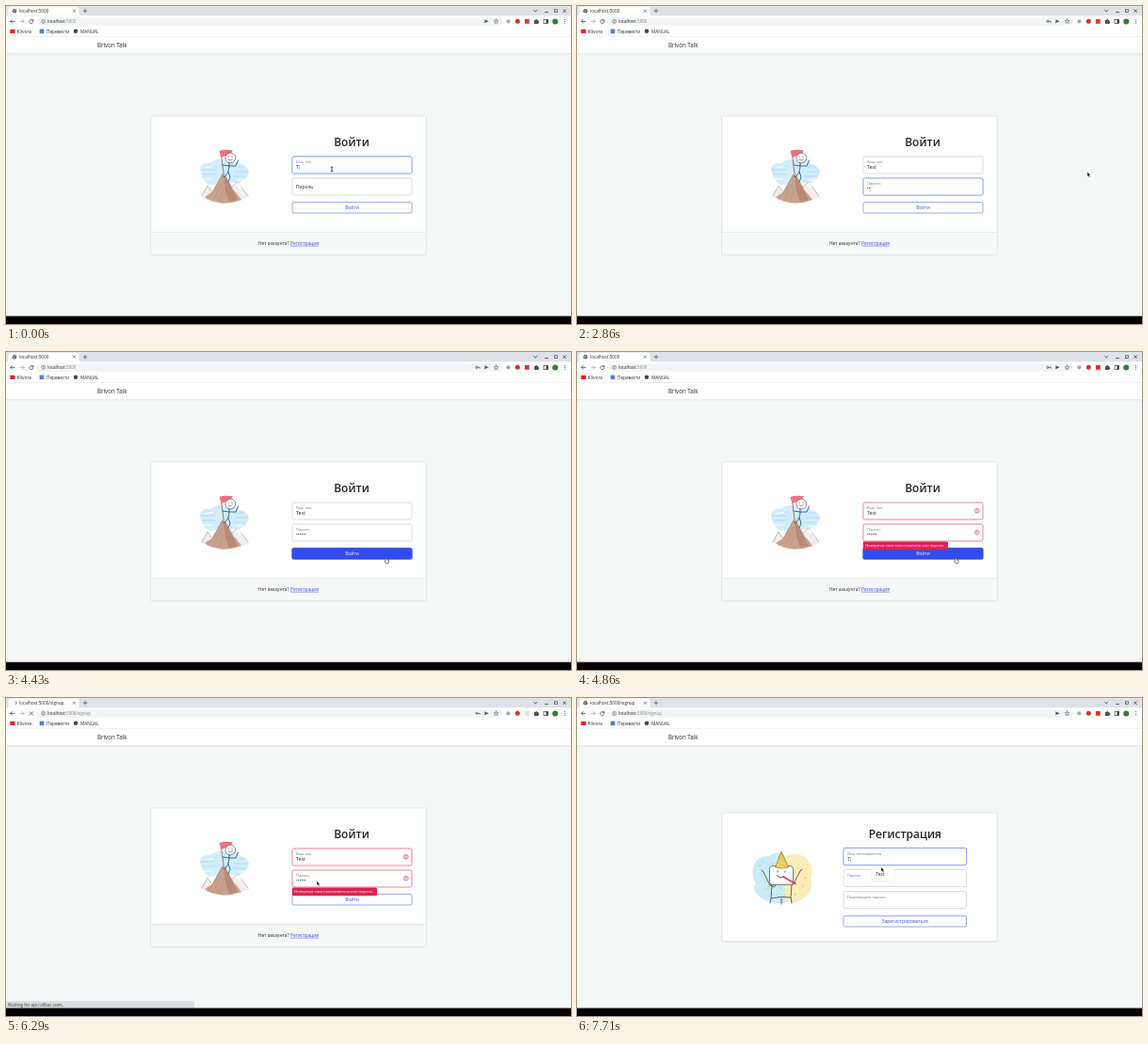
Recreate the animation shown at these times as an HTML page. Size 600x338 px, loop 8 s.

```html
<!DOCTYPE html>
<html lang="ru">
<head>
<meta charset="utf-8">
<style>
  html, body { margin: 0; width: 100%; height: 100%; overflow: hidden; background: #f5f7f7; }
  svg { display: block; font-family: "Open Sans", "Noto Sans", sans-serif; }
</style>
</head>
<body>
<svg id="stage" width="600" height="338" viewBox="0 0 600 338"></svg>
<script>
const LOOP = 8000, TICK = 1000 / 7;
const NICK = 'Test', BLUE = '#304cf0', RED = '#dc3256', INK = '#24272b';

const text = (x, y, size, str, fill = INK, more = '') =>
  `<text x="${x}" y="${y}" font-size="${size}" fill="${fill}" ${more}>${str}</text>`;
const rect = (x, y, w, h, fill, more = '') =>
  `<rect x="${x}" y="${y}" width="${w}" height="${h}" fill="${fill}" ${more}/>`;
const disc = (x, y, r, fill, more = '') =>
  `<circle cx="${x}" cy="${y}" r="${r}" fill="${fill}" ${more}/>`;
const fill = (d, color, more = '') => `<path d="${d}" fill="${color}" ${more}/>`;
const line = (d, color = '#555', w = 0.8) =>
  `<path d="${d}" fill="none" stroke="${color}" stroke-width="${w}" stroke-linecap="round" stroke-linejoin="round"/>`;
const middle = 'text-anchor="middle"';

function globe(x, y) {
  return disc(x, y, 2.3, '#4d5156') +
    line(`M${x - 1.4} ${y - .7}l1.3 .5l-.3 1.4M${x + .6} ${y - 1.5}l.9 1.2`, '#fff', .6);
}

function browser(k) {
  const signup = k >= 38, loading = k >= 38 && k < 48;
  const spin = k * 50 % 360;
  let s = rect(0, 0, 600, 10.5, '#dee1e6') + rect(0, 10.5, 600, 22, '#fff') +
    fill('M0 10.5Q2.5 10.5 2.5 8V3Q2.5 .8 5 .8H75Q77.5 .8 77.5 3V8Q77.5 10.5 80 10.5Z', '#fff');
  s += loading
    ? `<g transform="rotate(${spin} 9 5.3)">${line('M9 3.1A2.2 2.2 0 0 1 11.2 5.3', '#68707a')}</g>`
    : globe(9, 5.3);
  s += text(14, 7.1, 4.65, 'localhost:5000' + (signup ? '/signup' : ''));
  s += line('M71.2 4l2.4 2.4m0 -2.4l-2.4 2.4M82 5.2h4m-2 -2v4', '#50555a', .7);
  s += line('M560.6 4.5l1.6 1.5l1.6 -1.5M572.5 6.6h3M591.7 3.8l2.8 2.8m0 -2.8l-2.8 2.8', '#3c4043', .8) +
    rect(582.6, 3.8, 2.8, 2.8, 'none', 'stroke="#3c4043" stroke-width=".7"');

  s += rect(33, 12.2, 494, 8.6, '#f2f4f5', 'rx="4.3"');
  s += line('M9 16.4H4.8m1.9 -1.9l-1.9 1.9l1.9 1.9', '#484c50') +
    line('M15 16.4h4.2m-1.9 -1.9l1.9 1.9l-1.9 1.9', '#a9adb1');
  s += loading ? line('M25.2 14.6l3.6 3.6m0 -3.6l-3.6 3.6', '#484c50')
    : line('M28.5 15.2A2.1 2.1 0 1 0 29 17M29 14.2v1.7h-1.7', '#484c50', .75);
  s += disc(39.7, 16.4, 2, 'none', 'stroke="#5f6368" stroke-width=".6"') +
    line('M39.7 16.2v1.2M39.7 15.3v.01', '#5f6368', .6);
  s += text(44, 18, 4.5, 'localhost<tspan fill="#85898d">:5000' + (signup ? '/signup' : '') + '</tspan>');
  if (k >= 17 && k < 52) s += disc(499.8, 16.3, 1.1, 'none', 'stroke="#50555a" stroke-width=".8"') + line('M501 16.3h2.2v1', '#50555a');
  s += fill('M508 14.3l4.6 2l-4.6 2l.6 -2Z', '#50555a') +
    line('M520.5 14l.7 1.6l1.7 .1l-1.3 1.1l.4 1.7l-1.5 -.9l-1.5 .9l.4 -1.7l-1.3 -1.1l1.7 -.1Z', '#50555a', .55);
  s += disc(533.4, 16.3, 2.1, '#a5a8ab') + disc(543.3, 16.3, 2.5, '#dc3030') +
    rect(550.9, 14, 4.8, 4.8, loading ? '#f4d3d3' : '#df3434');
  s += fill('M561 15h1.3a.9 .9 0 0 1 1.8 0h1.2v1.3a.9 .9 0 0 1 0 1.8v.8h-4.3Z', '#4b4f53') +
    rect(571, 14.3, 4.5, 4.2, 'none', 'stroke="#3c4043" stroke-width=".7"') + rect(573.5, 14.3, 2, 4.2, '#3c4043') +
    disc(583.2, 16.4, 3, '#347e33') + [14.5, 16.4, 18.3].map(y => disc(593.5, y, .5, '#444')).join('');

  s += rect(4.3, 24.8, 5.2, 4.2, '#ee1c24') + text(11.5, 28.7, 4.9, 'Klivora') +
    rect(35.7, 24.6, 4.6, 4.6, '#4c7fe0') + text(43, 28.7, 4.7, 'Перевести') +
    disc(74, 26.8, 2.3, '#40464c') + text(79, 28.7, 4.7, 'MANUAL');
  s += rect(0, 32.3, 600, .5, '#dcdfe2') + rect(0, 32.8, 600, 17.7, '#fff') +
    rect(0, 50.3, 600, .7, '#e2e5e6') + rect(0, 51, 600, 1.2, '#eff1f1');
  s += text(97, 43.8, 6.2, 'Brivon Talk');
  return s;
}

function card(y, h) {
  return rect(153, y + .5, 294, h + 1, '#e9ebec', 'rx="2"') +
    rect(154, y, 292, h, '#fff', 'rx="1.5" stroke="#d9dcde" stroke-width=".6"');
}

const caretMark = on => on ? '<tspan font-size="5.3" font-weight="300" dx="-1">|</tspan>' : '';

function field(x, y, w, label, { value = '', focus, bad, caret, big } = {}) {
  const edge = bad ? '#e36580' : focus ? '#799bf4' : '#d2d6da';
  let s = focus ? rect(x - .8, y - .8, w + 1.6, 19.6, '#c9d8fc', 'rx="2.4"') : '';
  s += rect(x, y, w, 18, '#fff', `rx="1.6" stroke="${edge}" stroke-width=".8"`);
  s += big ? text(x + 4, y + 10.9, 5, label) : text(x + 4, y + 7, 4, label, '#777d83');
  if (value || caret) s += text(x + 4, y + 13.1, value[0] === '•' ? 4.6 : 5.2, value + caretMark(caret));
  if (bad) s += disc(x + w - 6.2, y + 8.7, 2.3, 'none', `stroke="${RED}" stroke-width=".7"`) +
    line(`M${x + w - 6.2} ${y + 7.6}v1.2M${x + w - 6.2} ${y + 9.9}v.01`, RED, .7);
  return s;
}

function button(x, y, w, label, active) {
  return (active ? rect(x - .9, y - .9, w + 1.8, 13.2, '#a9b8fa', 'rx="2"') : '') +
    rect(x, y, w, 11.4, active ? BLUE : '#fff', `rx="1.4" stroke="${active ? BLUE : '#7890f3'}" stroke-width=".8"`) +
    text(x + w / 2, y + 7.5, 4.9, label, active ? '#fff' : BLUE, middle);
}

const climber =
  fill('M206 172Q209 166 217 167Q224 161 233 164Q243 162 249 168Q256 169 258 176Q257 184 248 188L215 190Q206 182 206 172Z', '#d2edfb') +
  line('M207 174h15M209 179h14M215 170h9M243 171h10M243 176h14M241 181h13', '#a9d9f3', .8) +
  line('M208 184h10M246 185h9M212 172l8 -2', '#fff', 1.2) +
  fill('M207 202L214 191L219 198L231 177L241 192L246 187L258 203Q244 210 232 210Q215 209 207 202Z', '#f4eeea') +
  fill('M211 203L219 198L230 178L234 182L238 194L244 198L250 206Q240 210 230 209.5Q217 208 211 203Z', '#c9a28e') +
  fill('M231 178L238 190L246 206L237 208L233 197Z', '#b78a75') +
  line('M214 206L224 191M220 207L229 188M226 208L231 194', '#b48c79', .5) +
  line('M208 202L214 191L218 197M219 198L231 177L242 197M238 194L246 187L257 202', '#97857c', .5) +
  fill('M246 187L243 192L246 191L248 194L250 192Z', '#fff') +
  line('M228 155L231 177', '#6c4948', .7) +
  fill('M226.5 154Q233 152 241 153.5L238 157.5L228.5 161Z', '#f27183') +
  disc(238.3, 161.5, 5.4, '#fff', 'stroke="#4e5358" stroke-width=".7"') +
  line('M236 160v.6M240 160v.6M236 163.2q2.4 1.8 4.4 -.3', '#444', .6) +
  line('M237 167Q237.5 172 235.7 177L232 182L230.5 181M236 176L238 182L236 187M237 170L230 169M237 170L244 170L246.5 164', '#355b84', .9);

const partyBits = (() => {
  let seed = 5, s = '';
  const rnd = () => (seed = seed * 16807 % 2147483647) / 2147483647;
  for (let i = 0; i < 42; i++) {
    const a = rnd() * 6.28, r = 12 + rnd() * 17;
    s += disc(218 + r * 1.04 * Math.cos(a), 191 + r * .82 * Math.sin(a), .5 + rnd() * .5, ['#f1c34a', '#74c5e8', '#fff', '#f6dc85'][i % 4]);
  }
  return s;
})();

const party =
  fill('M187 181Q189 169 203 168Q216 161 221 169V217Q207 221 195 212Q185 205 190 197Q185 190 187 181Z', '#c9ebf8') +
  fill('M221 168Q239 162 246 174Q252 181 248 190Q252 202 244 210Q235 219 221 217Z', '#fbecb8') + partyBits +
  rect(204.5, 178.5, 25, 20, '#fff', 'rx="3" stroke="#44484c" stroke-width=".7"') +
  fill('M217 163L210.5 180Q218 182 224.5 180Z', '#f2c64f', 'stroke="#74663d" stroke-width=".6"') +
  line('M214 173l6 3M212 177l7 3', '#fff3bd', .7) +
  line('M213 184v1M221 184v1M212 189q4 3 8 1', '#333', .8) +
  line('M219 190L232 197.5', '#dd4252', 1.7) +
  line('M205 199L198 185M205 199Q210 202 211 199M229 199L237 184M198 185l-2 -2M237 184l2 -2M207 199L206 213L205 218M228 199L227 212L228 218M206 213Q217 210 227 212M217 213V219', '#3f4347', .8);

function loginPage(k) {
  const bad = k >= 32, onName = k < 13, onPass = k >= 13 && k < 31;
  const dots = [18, 20, 21, 23, 24, 25].filter(n => k >= n).length;
  const nameCaret = k < 5 || (k >= 9 && k < 12);
  let s = card(117, 147) + rect(154.3, 240.5, 291.4, 23.2, '#f6f7f7') + rect(154, 240.2, 292, .6, '#dcdfe1') + climber;
  s += text(367, 149, 12, 'Войти', INK, middle + ' font-weight="600"');
  s += field(304, 160, 127, 'Ваш ник', { value: NICK.slice(0, 1 + k), focus: onName, caret: onName && nameCaret, bad });
  s += field(304, 183, 127, 'Пароль', { value: '•'.repeat(dots), focus: onPass, caret: onPass && (dots || k % 7 < 4), bad, big: onName });
  s += button(304, 208.6, 127, 'Войти', k >= 30 && k < 36);
  if (bad) s += rect(303.8, 201.4, 90.2, 8.8, '#e02150', 'rx="1.4"') +
    text(306.2, 207.2, 4.15, 'Неверные имя пользователя или пароль', '#fff');
  s += text(268, 253.8, 4.8, 'Нет аккаунта?') + text(302, 253.8, 4.9, 'Регистрация', BLUE, 'text-decoration="underline"');
  return s;
}

function signupPage(k) {
  const typed = k >= 53;
  let s = card(122, 136.5) + party;
  s += text(348.3, 149, 12, 'Регистрация', INK, middle + ' font-weight="600"');
  s += field(283, 159.5, 130.5, 'Имя пользователя', { value: typed ? NICK[0] : '', focus: true, caret: typed || k % 7 < 4 });
  s += field(283, 182.5, 130.5, 'Пароль') + field(283, 205.5, 130.5, 'Подтвердите пароль');
  s += button(283, 231.7, 130.5, 'Зарегистрироваться');
  if (typed) s += rect(312.6, 180.8, 24.8, 14.4, '#e3e5e7', 'rx="1.6"') + rect(313, 180.8, 24, 13.6, '#fff', 'rx="1.4"') +
    text(317.3, 189.3, 5.1, NICK);
  return s;
}

// Pointer keys: tick, x, y
const path = [
  [0, 346, 173.5], [9, 346, 173.5], [11, 341, 195.5], [13, 341, 195.5], [16, 540, 180], [18, 542, 176.5],
  [24, 542, 176.5], [28, 438, 237], [30, 404, 219], [34, 402, 219], [37, 317, 251], [39, 317, 251],
  [43, 330, 194.5], [45, 330, 194.5], [48, 323, 179.8], [56, 323, 179.8]
];

function pointer(k) {
  const i = path.findIndex(p => p[0] > k), [t0, x0, y0] = path[i - 1], [t1, x1, y1] = path[i];
  const p = (k - t0) / (t1 - t0), x = x0 + (x1 - x0) * p, y = y0 + (y1 - y0) * p;
  const hand = (k >= 30 && k < 36) || (k >= 37 && k < 40);
  const shape = k < 14 ? line('M-1 -2.5Q0 -2.5 0 -1.8Q0 -2.5 1 -2.5M0 -2V2M-1 2.5Q0 2.5 0 1.8Q0 2.5 1 2.5', '#222', .75)
    : hand ? fill('M-.3 0Q.8 -.8 1 .4V1.8L3 2.2V4.5L2.3 5.5H0L-1.5 3.3L-.4 3Z', '#fff', 'stroke="#333" stroke-width=".6"')
    : fill('M0 0V4.8L1.1 3.8L2 5.6L2.9 5.1L2 3.4H3.4Z', '#151515', 'stroke="#fff" stroke-width=".3"');
  return `<g transform="translate(${x} ${y})">${shape}</g>`;
}

function scene(k) {
  let s = rect(0, 0, 600, 338, '#f5f7f7') + browser(k) + (k < 46 ? loginPage(k) : signupPage(k));
  if (k >= 39 && k < 48) s += rect(-2, 322.2, 202, 8, '#d9dce0', 'rx="1"') + text(2, 327.6, 4.6, 'Waiting for api.rollbar.com…', '#3c4043');
  return s + rect(0, 329.6, 600, 8.4, '#000') + pointer(k);
}

const stage = document.getElementById('stage');
let shown = -1;
function frame(now) {
  const k = Math.min(55, Math.floor((now % LOOP + 8) / TICK));
  if (k !== shown) stage.innerHTML = scene(shown = k);
  requestAnimationFrame(frame);
}
frame(performance.now());
</script>
</body>
</html>
```
